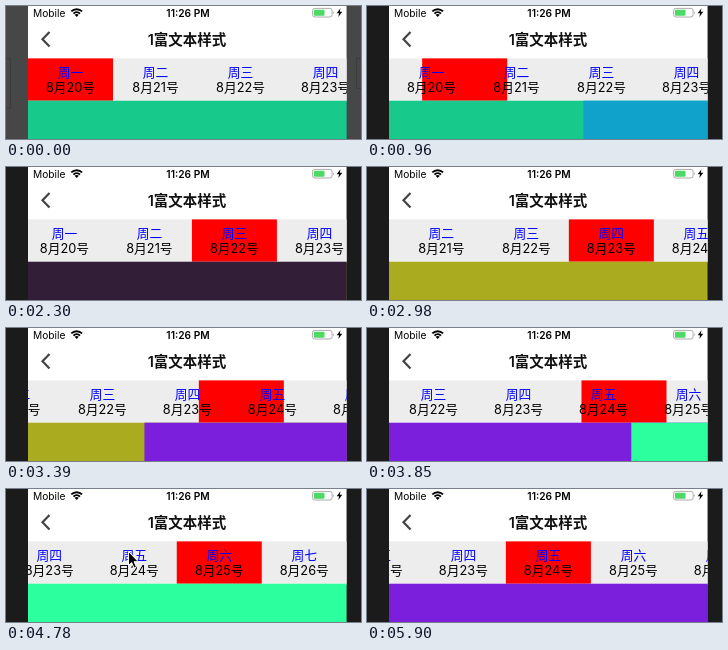
Write an HTML page with a canvas that moves like this. It is 355 by 133 pixels and loops after 6140 ms.

```html
<!DOCTYPE html>
<html lang="zh-CN">
<head>
<meta charset="utf-8">
<style>
  html, body { margin: 0; width: 100%; height: 100%; overflow: hidden; background: #1b1b1b; }
  canvas { display: block; width: 355px; height: 133px; }
</style>
</head>
<body>
<canvas id="stage"></canvas>
<script>
const LOOP = 6140, W = 355, H = 133;
const LEFT = 22, TAB = 85, SCREEN = TAB * 3.75, TAB_TOP = 52.4, PAGE_TOP = 94.7;
const FONT = 'Inter, "Noto Sans CJK SC", "Noto Sans CJK", sans-serif';
const DAYS = '一二三四五六七';
const PAGE_COLORS = ['#17c98a', '#10a2ca', '#321e36', '#abab20', '#7b1fdc', '#2bff9e', '#888888'];

const linear = x => x;
const easeOut = x => 1 - (1 - x) ** 3;
const easeInOut = x => (1 - Math.cos(Math.PI * x)) / 2;

// Keys: [time, value, easing towards this key]; equal times make a jump.
const pageKeys = [
  [0, 0], [840, 0], [840, .22], [960, .39, easeOut],
  [1200, .39], [1200, .5], [1490, 1, easeOut],
  [1670, 1], [1670, 1.284], [1780, 1.42, easeOut],
  [1960, 1.42], [1960, 1.5], [2240, 2, easeOut],
  [2540, 2], [2660, 2.4], [2880, 3, easeOut],
  [3180, 3], [3330, 3.4], [3730, 4, easeOut],
  [3790, 4], [3850, 4.2375], [3940, 4.45], [4420, 5, easeOut],
  [5115, 5], [5490, 4, easeInOut]
];

// Scroll that centres a tab, limited to the ends of the bar.
const centred = tab => Math.max(0, Math.min((tab + .5) * TAB - SCREEN / 2, 7 * TAB - SCREEN));
const scrollKeys = [[0, 0]];
[[2235, 2535, 2], [2879, 3179, 3], [3730, 4030, 4], [4450, 4775, 5], [5115, 5490, 4]]
  .forEach(([start, end, tab]) => {
    scrollKeys.push([start, scrollKeys.at(-1)[1]], [end, centred(tab), easeInOut]);
  });

function valueAt(keys, t) {
  const next = keys.findIndex(key => key[0] > t);
  if (next < 0) return keys.at(-1)[1];
  const [t0, v0] = keys[next - 1];
  const [t1, v1, ease = linear] = keys[next];
  return v0 + (v1 - v0) * ease((t - t0) / (t1 - t0));
}

const canvas = document.getElementById('stage');
const ctx = canvas.getContext('2d');
const ratio = window.devicePixelRatio || 1;
canvas.width = W * ratio;
canvas.height = H * ratio;
ctx.scale(ratio, ratio);

function rect(x, y, w, h, color) {
  ctx.fillStyle = color;
  ctx.fillRect(x, y, w, h);
}

function text(str, x, y, size, color = '#000', weight = 400, align = 'center') {
  ctx.font = `${weight} ${size}px ${FONT}`;
  ctx.textAlign = align;
  ctx.fillStyle = color;
  ctx.fillText(str, x, y);
}

function line(points, color, width) {
  ctx.beginPath();
  points.forEach(([x, y]) => ctx.lineTo(x, y));
  ctx.strokeStyle = color;
  ctx.lineWidth = width;
  ctx.stroke();
}

function fillPath(d, color) {
  ctx.fillStyle = color;
  ctx.fill(new Path2D(d));
}

function drawSurround(t) {
  rect(0, 0, W, H, t < 840 ? '#474747' : '#1b1b1b');
  if (t >= 840) return;
  line([[0, 52.5], [4.5, 52.5], [4.5, 102.5], [0, 102.5]], '#3c3c3c', 1);
  line([[W, 52.5], [350.5, 52.5], [350.5, 82.5], [W, 82.5]], '#3c3c3c', 1);
}

function drawStatusBar() {
  text('Mobile', 27, 10.5, 10.2, '#000', 400, 'left');
  text('11:26 PM', 182, 10.5, 10.2, '#000', 600);

  ctx.strokeStyle = '#000';
  ctx.lineWidth = 1.9;
  for (const r of [4.6, 7.6]) {
    ctx.beginPath();
    ctx.arc(70.7, 10.8, r, -Math.PI * .75, -Math.PI * .25);
    ctx.stroke();
  }
  fillPath('M70.7 11 L68.6 8.8 Q70.7 7.1 72.8 8.8 Z', '#000');

  ctx.strokeStyle = '#999';
  ctx.lineWidth = .8;
  ctx.beginPath();
  ctx.roundRect(306.6, 2.4, 19.5, 8.6, 2.2);
  ctx.stroke();
  ctx.fillStyle = '#4cd964';
  ctx.beginPath();
  ctx.roundRect(307.9, 3.7, 10.6, 6, 1);
  ctx.fill();
  fillPath('M327 5.2 Q328.7 6.7 327 8.2 Z', '#999');
  fillPath('M334.5 2.3 L330.7 7.3 H333.1 L332.3 11 L336.3 5.8 H333.8 Z', '#000');
}

function drawTabs(page, scroll) {
  rect(LEFT, TAB_TOP, SCREEN, PAGE_TOP - TAB_TOP, '#ededed');
  rect(LEFT + page * TAB - scroll, TAB_TOP, TAB, PAGE_TOP - TAB_TOP, '#ff0000');
  [...DAYS].forEach((day, i) => {
    const x = LEFT + (i + .5) * TAB - scroll;
    text('周' + day, x, 70.7, 12.75, '#0000ff');
    text(`8月${20 + i}号`, x, 85.5, 12.75);
  });
}

// Only the two pages in view; the right one starts where the left one ends.
function drawPages(page) {
  const left = Math.floor(page);
  const edge = LEFT + (left + 1 - page) * SCREEN;
  rect(LEFT, PAGE_TOP, SCREEN, H - PAGE_TOP, PAGE_COLORS[left]);
  rect(edge, PAGE_TOP, SCREEN, H - PAGE_TOP, PAGE_COLORS[left + 1]);
}

function drawCursor() {
  const arrow = new Path2D('M122.5 62.5 V76.5 L125.7 73.6 L128 79 L130.4 78 L128.1 72.7 H132.3 Z');
  ctx.fillStyle = '#000';
  ctx.fill(arrow);
  ctx.strokeStyle = '#fff';
  ctx.lineWidth = 1;
  ctx.stroke(arrow);
}

function draw(t) {
  const page = valueAt(pageKeys, t);
  drawSurround(t);
  ctx.save();
  ctx.beginPath();
  ctx.rect(LEFT, 0, SCREEN, H);
  ctx.clip();
  rect(LEFT, 0, SCREEN, PAGE_TOP + 1, '#fff');
  drawStatusBar();
  line([[43.5, 26], [36.5, 33.3], [43.5, 40.6]], '#444', 2.2);
  text('1富文本样式', 181, 38.6, 14.5, '#111', 600);
  drawTabs(page, valueAt(scrollKeys, t));
  drawPages(page);
  if (t >= 4640 && t < 5130) drawCursor();
  ctx.restore();
}

const start = performance.now();
function frame() {
  draw((performance.now() - start) % LOOP);
  requestAnimationFrame(frame);
}
frame();
</script>
</body>
</html>
```
